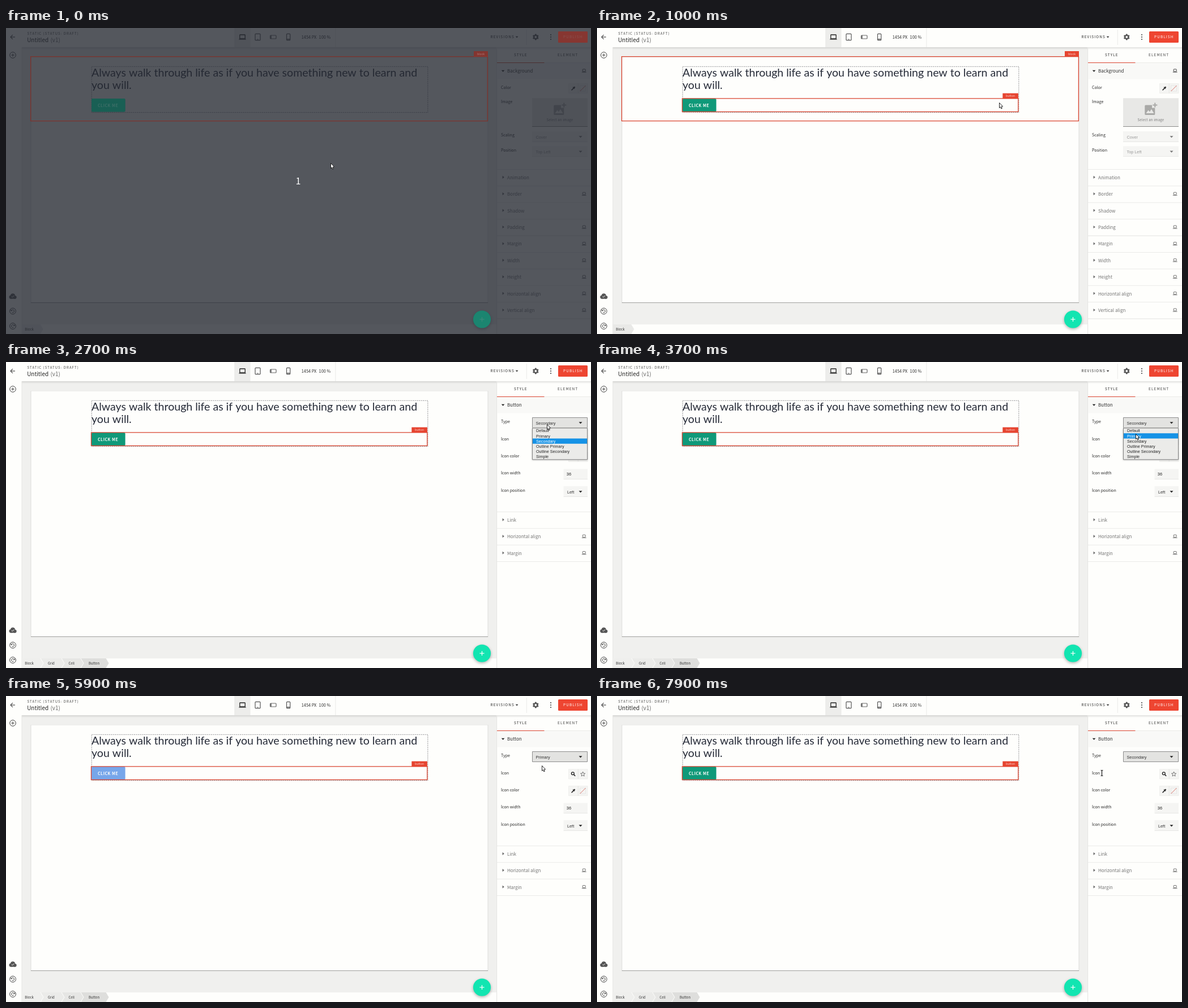
These frames come from a looping animation (1033x542 px, 8000 ms). An HTML page with a canvas:

```html
<!DOCTYPE html>
<html lang="en">
<head>
<meta charset="utf-8">
<title>Page editor</title>
<style>
html, body { margin: 0; width: 100%; height: 100%; overflow: hidden; background: #fefefc; }
canvas { display: block; width: 1033px; height: 542px; }
</style>
</head>
<body>
<canvas id="stage"></canvas>
<script>
const W = 1033, H = 542, LOOP = 8000, STEP = 100;
const canvas = document.getElementById('stage');
const c = canvas.getContext('2d');
const dpr = window.devicePixelRatio || 1;
canvas.width = W * dpr;
canvas.height = H * dpr;

const UI = '"Noto Sans CJK SC", "Noto Sans CJK JP", "Noto Sans CJK", "Open Sans", sans-serif';
const ARIAL = '"Liberation Sans", Arial, sans-serif';
const LATO = 'Lato, sans-serif';
const WHITE = '#fefefc', RED = '#d9432f', INK = '#2b2b2b', LINE = '#e4e4e2', FIELD = '#f5f5f3';

const OPTIONS = ['Default', 'Primary', 'Secondary', 'Outline Primary', 'Outline Secondary', 'Simple'];
const FILLS = [[233, 233, 230], [119, 166, 234], [15, 153, 121]];
const INKS = [[25, 25, 25], [254, 254, 252], [254, 254, 252]];

// Button type: [time of change, from, to]
const CHANGES = [[4000, 2, 1], [5900, 1, 0], [7300, 0, 2]];
const POPUPS = [[2700, 4000], [5100, 5800], [6300, 7300]];
const LIST_TOP = 117, ROW = 9.22;

// Pointer path: [time, x, y]
const PATH = [
  [0, 573, 239], [300, 573, 239], [400, 614, 211], [500, 614, 211], [700, 655, 172],
  [900, 695, 140], [1100, 725, 124], [1300, 735, 119], [1800, 735, 119], [2100, 850, 113],
  [2500, 955, 110], [3000, 955, 110], [3300, 952, 121], [3500, 950, 127], [3700, 951, 127],
  [4600, 951, 127], [5000, 950, 110], [5300, 950, 110], [5500, 946, 122], [5900, 946, 123],
  [6000, 946, 123], [6300, 950, 109], [6500, 950, 109], [6900, 950, 132], [7100, 950, 132],
  [7200, 950, 137], [7700, 950, 137], [7900, 891.5, 136.5]
];

function pointerAt(t) {
  for (let i = 1; i < PATH.length; i++) {
    const [t0, x0, y0] = PATH[i - 1], [t1, x1, y1] = PATH[i];
    if (t <= t1) {
      const k = (t - t0) / (t1 - t0);
      return [x0 + (x1 - x0) * k, y0 + (y1 - y0) * k];
    }
  }
  return PATH[PATH.length - 1].slice(1);
}

function buttonAt(t) {
  let from = 2, to = 2, k = 1, value = 2;
  for (const [at, a, b] of CHANGES) {
    if (t < at) break;
    from = a; to = b;
    k = Math.min(1, (t - at) / 300);
    value = t > at ? b : a;
  }
  const mix = set => `rgb(${set[from].map((v, i) => Math.round(v + (set[to][i] - v) * k))})`;
  return { value, fill: mix(FILLS), ink: mix(INKS) };
}

// Drawing helpers
function rect(x, y, w, h, fill, r = 0) {
  c.fillStyle = fill;
  c.beginPath();
  c.roundRect(x, y, w, h, r);
  c.fill();
}

function frame(x, y, w, h, color, width = 1, r = 0) {
  c.strokeStyle = color;
  c.lineWidth = width;
  c.beginPath();
  c.roundRect(x, y, w, h, r);
  c.stroke();
}

function trace(points, closed) {
  c.beginPath();
  for (let i = 0; i < points.length; i += 2) c.lineTo(points[i], points[i + 1]);
  if (closed) c.closePath();
}

function poly(fill, ...points) {
  trace(points, true);
  c.fillStyle = fill;
  c.fill();
}

function line(color, width, ...points) {
  trace(points, false);
  c.strokeStyle = color;
  c.lineWidth = width;
  c.stroke();
}

function disc(x, y, r, fill) {
  c.fillStyle = fill;
  c.beginPath();
  c.arc(x, y, r, 0, 7);
  c.fill();
}

function ring(x, y, r, color, width, a0 = 0, a1 = Math.PI * 2) {
  c.strokeStyle = color;
  c.lineWidth = width;
  c.beginPath();
  c.arc(x, y, r, a0, a1);
  c.stroke();
}

function plus(x, y, r, color, width) {
  line(color, width, x - r, y, x + r, y);
  line(color, width, x, y - r, x, y + r);
}

// y is the middle of the capitals
function text(s, x, y, size, color, { weight = 500, font = UI, gap = 0, align = 'left' } = {}) {
  c.font = `${weight} ${size}px ${font}`;
  c.letterSpacing = gap + 'px';
  c.textAlign = align;
  c.fillStyle = color;
  c.fillText(s, x, y + size * 0.37);
}

const label = (s, y) => text(s, 874, y, 7.05, INK);
const plain = (s, x, y, color, size = 7.3) => text(s, x, y, size, color, { weight: 400, font: ARIAL });
const caret = (x, y, color) => poly(color, x - 3, y - 1.5, x + 3, y - 1.5, x, y + 1.7);

// Coloured parts, also used to glow through the dimming
const publishBox = () => rect(975, 6, 52, 20, '#ee4531', 1.5);
const clickBox = fill => rect(151, 125, 59.6, 23.6, fill, 2);
const addDisc = () => disc(840.5, 516, 15.6, '#12e5b1');

function blockOutline() {
  frame(43.6, 50.6, 806.8, 114, RED, 1.3);
  tag('block', 826, 41, 25);
}

function laptop(x, y, w, color, width) {
  const h = w * 0.62;
  frame(x - w / 2 + 0.8, y - h / 2 - 0.6, w - 1.6, h, color, width, 0.6);
  line(color, width, x - w / 2 - 0.6, y + h / 2 + 0.5, x + w / 2 + 0.6, y + h / 2 + 0.5);
}

function select(s, x, y, w, color, focused) {
  rect(x, y, w, 18.5, focused ? '#e3e3e1' : FIELD);
  if (focused) frame(x + 0.5, y + 0.5, w - 1, 18, '#8c8c8c', 1);
  else rect(x, y + 18, w, 0.7, '#e0e0de');
  plain(s, x + 6.5, y + 10.3, color);
  caret(1014.5, y + 9.7, color === '#999' ? '#777' : '#222');
}

function iconPair(y) {
  rect(993.5, y - 8.5, 33.5, 17, FIELD);
  frame(993.5, y - 8.5, 33.5, 17, '#ebebe9', 0.7);
  line('#dededc', 0.7, 1010.3, y - 8.5, 1010.3, y + 8.5);
}

function colorPair(y) {
  iconPair(y);
  line('#222', 1.5, 998.6, y + 3.2, 1002.4, y - 0.6);
  line('#222', 1.2, 1001, y - 2.4, 1004, y + 0.6);
  line('#222', 2.3, 1002.6, y - 0.9, 1004.5, y - 2.8);
  frame(1013.5, y - 5, 10, 10, '#dcdcda', 0.6);
  line('#d8736a', 1, 1013.5, y + 5, 1023.5, y - 5);
}

function searchPair(y) {
  iconPair(y);
  ring(1000.8, y - 1, 2.4, '#222', 1.3);
  line('#222', 1.6, 1002.6, y + 0.8, 1005.2, y + 3.4);
  const star = [];
  for (let i = 0; i < 10; i++) {
    const a = i * Math.PI / 5 - Math.PI / 2, r = i % 2 ? 1.9 : 4.3;
    star.push(1018.6 + r * Math.cos(a), y + 0.2 + r * Math.sin(a));
  }
  trace(star, true);
  c.strokeStyle = '#555';
  c.lineWidth = 0.8;
  c.stroke();
}

function header() {
  rect(0, 0, W, 34, WHITE);
  for (let i = 0; i < 4; i++) rect(0, 34 + i, W, 1, `rgba(0,0,0,${0.1 - i * 0.025})`);
  line('#444', 1.1, 16, 16, 8, 16);
  line('#444', 1.1, 11.8, 12.2, 8, 16, 11.8, 19.8);
  text('STATIC (STATUS: DRAFT)', 37.5, 10.2, 5.96, '#444', { gap: 1.1 });
  text('Untitled', 37.2, 20.9, 9.93, '#222', { weight: 400 });
  text('(v1)', 78.4, 20.9, 9.93, '#666', { weight: 400 });

  rect(404, 0, 27.5, 34, '#ededeb');
  rect(403.5, 0, 0.8, 34, LINE);
  rect(581.5, 0, 0.8, 34, LINE);
  laptop(417.5, 16, 11, '#222', 1.3);
  frame(440, 10.3, 9, 11.4, '#555', 1.2, 1);
  line('#555', 1, 443.4, 20, 445.6, 20);
  frame(466.5, 13, 10.5, 6, '#666', 1.2, 1);
  line('#666', 1.6, 468, 13, 468, 19);
  frame(495.5, 10.3, 6.2, 11.4, '#555', 1.2, 1);
  line('#555', 1.4, 496, 19.8, 501, 19.8);
  text('1454 PX', 521.8, 16, 7.3, INK);
  text('100 %', 552.6, 16, 7.3, INK);

  text('REVISIONS', 855.5, 16, 6.45, INK, { gap: 1.1 });
  poly('#333', 899.8, 14.8, 904.4, 14.8, 902.1, 17.4);
  rect(918.8, 3, 0.8, 27, LINE);
  for (let i = 0; i < 6; i++) {
    const a = i * Math.PI / 3 + Math.PI / 6, x = Math.cos(a), y = Math.sin(a);
    line('#555', 2.6, 935.3, 16, 935.3 + 5.4 * x, 16 + 5.4 * y);
  }
  disc(935.3, 16, 4.2, '#555');
  disc(935.3, 16, 1.9, WHITE);
  for (const y of [12, 16, 20]) disc(962, y, 1.1, '#444');
  publishBox();
  text('PUBLISH', 984, 16, 6.45, '#fff', { gap: 1.1 });
}

function sidebar() {
  rect(0, 34, 28, H - 34, WHITE);
  rect(27.5, 34, 0.8, H - 34, LINE);
  ring(12, 48, 5.3, '#444', 1);
  plus(12, 48, 2.7, '#444', 1);
  disc(8.6, 476.6, 3.1, '#555');
  disc(12, 474.3, 4, '#555');
  disc(15.8, 476.9, 2.8, '#555');
  rect(8.5, 475, 7.5, 4.7, '#555');
  line(WHITE, 1, 9.8, 475.5, 11.3, 477, 14.3, 474);
  for (const [y, s] of [[501.5, 1], [528, -1]]) {
    ring(12, y, 5.4, '#444', 1);
    if (s > 0) ring(12, y, 2.5, '#444', 1, -2.5, 2.2);
    else ring(12, y, 2.5, '#444', 1, 0.9, 5.6);
    poly('#444', 12 - 3.6 * s, y - 3.2, 12 - 3.6 * s, y - 0.2, 12 - 0.8 * s, y - 0.2);
  }
}

function tag(s, x, y, w) {
  rect(x, y, w, 9.5, '#e64430');
  text(s, x + w / 2, y + 5, 4.95, '#fbdcd6', { weight: 400, align: 'center', gap: 0.1 });
}

function page(picked, hovered, btn) {
  rect(28, 34, 839, 491, '#f0f0ee');
  rect(43.5, 51, 808, 436.3, '#dededc');
  rect(44, 485.8, 807, 1.2, '#a2a2a0');
  rect(44.5, 51.5, 806, 434.5, WHITE);
  if (!picked) blockOutline();
  c.setLineDash([2, 1.4]);
  frame(151.2, 68.3, 593.6, 81.3, '#85858a', 0.9);
  c.setLineDash([]);
  const big = { weight: 400, font: LATO };
  text('Always walk through life as if you have something new to learn and', 151, 79, 19.57, '#262b38', big);
  text('you will.', 151, 101.2, 19.57, '#262b38', big);
  clickBox(btn.fill);
  text('CLICK ME', 162, 137.1, 6.95, btn.ink, { weight: 700, gap: 0.55 });
  if (hovered) {
    frame(150.5, 124.8, 593.3, 23.6, RED, 1.3);
    tag('button', 716.3, 115.6, 27.6);
  }
}

function breadcrumbs(picked) {
  rect(28, 525, 839, 17, WHITE);
  const all = [['Block', 33.3, 61, '#efefed'], ['Grid', 74, 98, '#ebebe9'],
    ['Cell', 110.5, 132, '#e6e6e4'], ['Button', 146, 177, '#dededc']];
  const shown = picked ? all : [['Block', 33.3, 61, '#e9e9e7']];
  for (const [, , end, fill] of shown.slice().reverse()) {
    poly(fill, 28, 525, end, 525, end + 5, 533.5, end, 542, 28, 542);
    line(WHITE, 1, end, 525, end + 5, 533.5, end, 542);
  }
  for (const [s, x] of shown) text(s, x, 533.8, 5.96, '#333');
}

function addButton() {
  c.save();
  c.shadowColor = 'rgba(0,0,0,.3)';
  c.shadowBlur = 5 * dpr;
  c.shadowOffsetY = 2 * dpr;
  addDisc();
  c.restore();
  plus(840.5, 516, 4, '#fff', 1.2);
}

function accordion(top, rows) {
  rows.forEach(([s, icon], i) => {
    const y = top + 29.4 * i;
    rect(867, y, 166, 0.8, LINE);
    poly('#666', 876.6, y + 11.7, 879.8, y + 14.3, 876.6, y + 16.9);
    text(s, 885, y + 14.9, 8.05, '#747474');
    if (icon) laptop(1020.7, y + 14.4, 6.6, '#666', 0.9);
  });
  rect(867, top + 29.4 * rows.length, 166, 0.8, LINE);
}

function panel(title) {
  rect(866, 34, 167, 508, WHITE);
  rect(866.3, 34, 0.8, 508, '#dcdcda');
  for (let i = 0; i < 4; i++) rect(867, 34 + i, 166, 1, `rgba(0,0,0,${0.1 - i * 0.025})`);
  text('STYLE', 897, 48, 6.45, INK, { gap: 1.1 });
  text('ELEMENT', 974, 48, 6.45, '#444', { gap: 1.1 });
  rect(867, 62, 166, 28.5, '#f9f9f7');
  rect(867, 61.2, 166, 0.8, LINE);
  rect(867, 60.9, 83.5, 1.1, RED);
  poly('#222', 874.8, 74.8, 880.4, 74.8, 877.6, 77.8);
  text(title, 885, 76, 8.05, '#333');
}

function blockPanel() {
  panel('Background');
  laptop(1020.7, 75.6, 6.6, '#333', 0.9);
  label('Color', 105);
  colorPair(107);
  label('Image', 130.8);
  rect(929, 124.3, 98, 50, '#e8e8e6');
  rect(929, 174, 98, 1, '#8c8c8a');
  rect(967.3, 136.5, 18, 17.5, '#a9a9a7', 1.5);
  poly('#e8e8e6', 969.5, 151, 973.5, 145.5, 976, 148.5, 979, 143.8, 983.5, 151);
  rect(980, 131, 10, 10.5, '#e8e8e6');
  plus(985.3, 136.5, 4, '#a9a9a7', 2);
  text('Select an image', 954.5, 163.2, 5.96, '#777', { gap: 0.2 });
  label('Scaling', 189.8);
  select('Cover', 929, 183, 98, '#999');
  label('Position', 216.6);
  select('Top Left', 929, 209.4, 98, '#999');
  accordion(250, [['Animation'], ['Border', 1], ['Shadow'], ['Padding', 1], ['Margin', 1],
    ['Width', 1], ['Height', 1], ['Horizontal align', 1], ['Vertical align', 1]]);
}

function buttonPanel(value, focused) {
  panel('Button');
  label('Type', 105);
  select(OPTIONS[value], 929, 98, 98, '#333', focused);
  label('Icon', 136.2);
  searchPair(138.3);
  label('Icon color', 166.4);
  colorPair(168);
  label('Icon width', 196.4);
  rect(984.5, 189.5, 42.5, 17.5, FIELD);
  rect(984.5, 207, 42.5, 0.7, '#e0e0de');
  plain('36', 989.8, 198.6, '#222', 7.5);
  label('Icon position', 227.2);
  select('Left', 984.5, 220, 42.5, '#333');
  accordion(265, [['Link'], ['Horizontal align', 1], ['Margin', 1]]);
}

function popup(active) {
  c.save();
  c.shadowColor = 'rgba(0,0,0,.3)';
  c.shadowBlur = 3 * dpr;
  c.shadowOffsetY = dpr;
  rect(929, 116.6, 98, 56.6, '#ebebe9');
  c.restore();
  frame(929.5, 117, 97, 55.8, '#777', 0.9);
  OPTIONS.forEach((s, i) => {
    const y = LIST_TOP + ROW * i;
    if (i === active) rect(930, y, 96, ROW, '#1592e6');
    plain(s, 936, y + 4.7, i === active ? '#fff' : '#222', 7.2);
  });
}

function outlined(points, x, y) {
  c.save();
  c.translate(x, y);
  trace(points, true);
  c.lineJoin = 'round';
  c.fillStyle = '#fff';
  c.fill();
  c.strokeStyle = '#111';
  c.lineWidth = 0.9;
  c.stroke();
  c.restore();
}

function pointer(t, x, y) {
  if (t >= 7900) {
    line('#222', 1.3, x, y - 4.5, x, y + 4.5);
    line('#222', 1.1, x - 2, y - 4.8, x + 2, y - 4.8);
    line('#222', 1.1, x - 2, y + 4.8, x + 2, y + 4.8);
  } else if (t >= 1200 && t < 1900) {
    outlined([-0.6, 0.6, 0.8, 0.2, 2.6, 3.2, 4.6, 3.2, 5, 5, 5, 7.2, 4, 9.2,
      -0.4, 9.2, -2.6, 6.4, -1.8, 5.2, 0.2, 6, 0.2, 4], x, y);
  } else {
    outlined([0.5, 0.5, 0.5, 9.6, 2.4, 7.8, 3.8, 11, 5.3, 10.3, 4, 7.2, 6.6, 7], x, y);
  }
}

function countdown(btn) {
  rect(0, 0, W, H, 'rgba(36,40,49,.78)');
  c.globalAlpha = 0.35;
  blockOutline();
  clickBox(btn.fill);
  publishBox();
  addDisc();
  c.globalAlpha = 1;
  text('1', 516, 271, 16.2, '#fff', { weight: 400, align: 'center' });
}

function draw(t) {
  const [x, y] = pointerAt(t);
  const btn = buttonAt(t), picked = t >= 1800;
  c.setTransform(dpr, 0, 0, dpr, 0, 0);
  rect(0, 0, W, H, WHITE);
  page(picked, t >= 800, btn);
  header();
  sidebar();
  breadcrumbs(picked);
  addButton();
  if (picked) buttonPanel(btn.value, t >= 2500);
  else blockPanel();
  if (POPUPS.some(([a, b]) => t >= a && t < b)) {
    popup(y < LIST_TOP ? btn.value : Math.floor((y - LIST_TOP) / ROW));
  }
  if (t < 100) countdown(btn);
  pointer(t, x, y);
}

let start, last;
function tick(now) {
  start ??= now;
  const t = Math.floor(((now - start) % LOOP) / STEP) * STEP;
  if (t !== last) draw(last = t);
  requestAnimationFrame(tick);
}
draw(last = 0);
requestAnimationFrame(tick);
</script>
</body>
</html>
```
